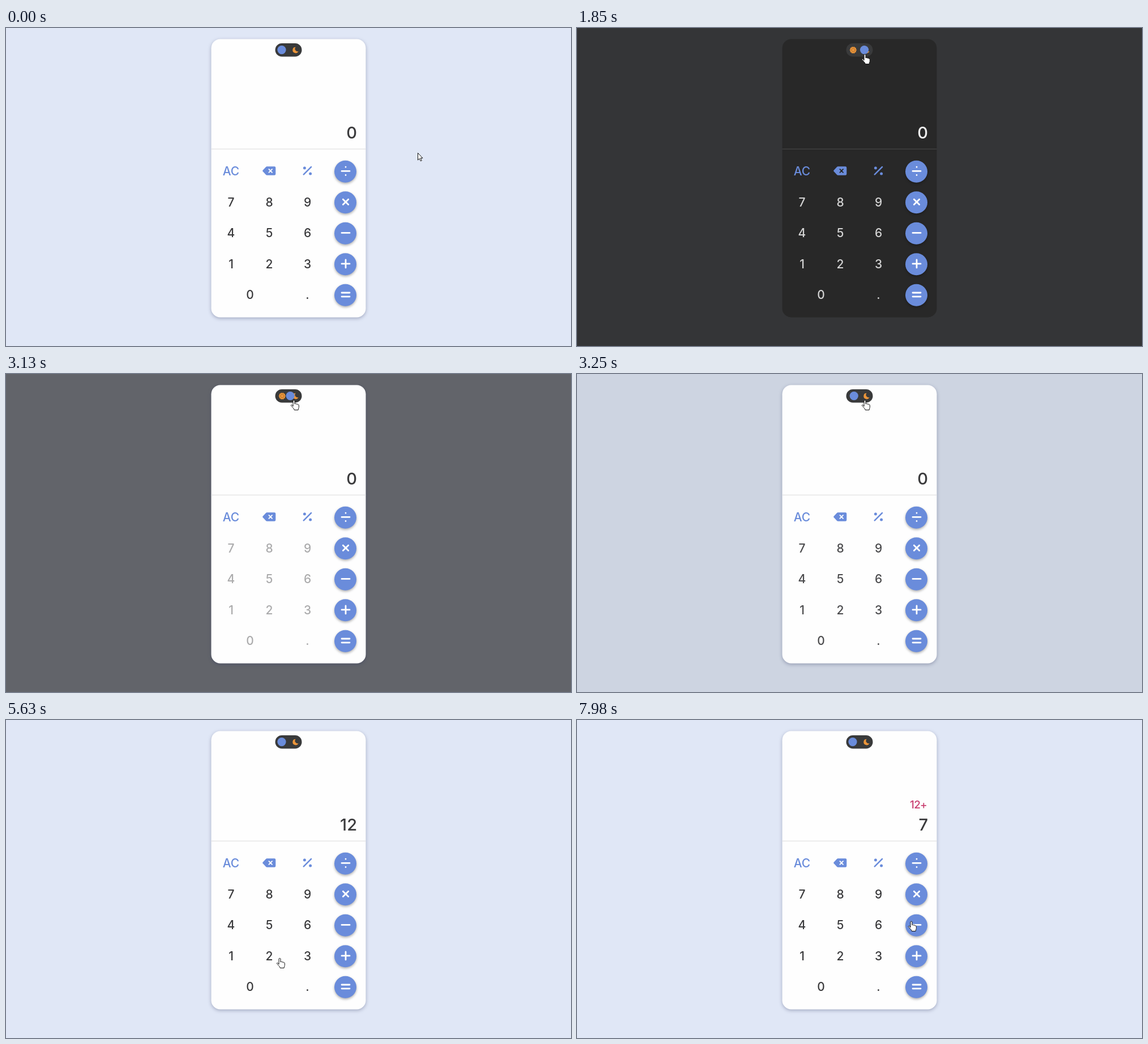
These frames come from a looping animation (998x561 px, 8 s). An HTML page:

```html
<!DOCTYPE html>
<html lang="en">
<head>
<meta charset="utf-8">
<title>Calculator</title>
<style>
  html, body { margin: 0; width: 100%; height: 100%; overflow: hidden; }
  svg { display: block; width: 100vw; height: 100vh; }
  text { font-family: Inter, "Open Sans", sans-serif; font-weight: 500; }
  #keys text { font-size: 21px; text-anchor: middle; }
  #value, #sum { text-anchor: end; }
  #value { font-size: 29px; }
  #sum { font-size: 19px; letter-spacing: -.8px; fill: #c93f70; }
  #card { filter: drop-shadow(0 2px 3px rgba(40, 50, 90, .34)); }
  .dark #card { filter: none; }
  .round { fill: #6a8cdb; filter: drop-shadow(0 2px 2px rgba(0, 0, 0, .32)); }
  .sign { stroke: #fff; stroke-width: 2.8; stroke-linecap: round; }
  .blue { fill: #6a8cdb; }
  .cursor { fill: #fff; stroke: #111; stroke-width: 1; stroke-linejoin: round; }
</style>
</head>
<body>
<svg id="stage" viewBox="0 0 998 561">
  <rect id="back" width="998" height="561"/>
  <rect id="card" x="362.5" y="19.5" width="273" height="491" rx="16"/>
  <path id="rule" d="M362.5 213.5H635.5"/>
  <rect x="475.5" y="27" width="47" height="23.5" rx="11.75" fill="#393a3b"/>
  <g id="sun" fill="#ec9539"></g>
  <path fill="#ec9539" d="M511.6 33.7a5.3 5.3 0 1 0 4.9 7.4a4.6 4.6 0 0 1-4.9-7.4z"/>
  <circle id="ball" cy="38.6" r="7.6" class="blue"/>
  <text id="sum" x="618" y="156"></text>
  <text id="value" x="620" y="194.5"></text>
  <g id="keys"></g>
  <g class="blue">
    <path d="M453.6 251.1l5.6-6a2.4 2.4 0 0 1 1.8-.8h13a2.3 2.3 0 0 1 2.3 2.3v10.8a2.3 2.3 0 0 1-2.3 2.3h-13a2.4 2.4 0 0 1-1.8-.8l-5.6-6a1.3 1.3 0 0 1 0-1.8z"/>
    <path id="cross" d="M464.4 249.2l5.6 5.6m0-5.6l-5.6 5.6" stroke-width="1.9" stroke-linecap="round"/>
    <path d="M525.8 258.4L539 245.2" stroke="#6a8cdb" stroke-width="2.5" stroke-linecap="round"/>
    <circle cx="527.4" cy="246.9" r="2.5"/>
    <circle cx="537.6" cy="257" r="2.5"/>
  </g>
  <g id="signs"></g>
  <g id="pointer">
    <path id="arrow" class="cursor" d="M.5 .5V13l2.8-2.7 2 4.4 2-.9-2-4.3H9z"/>
    <path id="hand" class="cursor" d="M-1 11V1.8a1.5 1.5 0 0 1 3 0V7c.6-1.1 2.7-.9 2.9.4 .8-.9 2.5-.5 2.6.8 .7-.6 1.8-.1 1.8 1.2V12.400c0 1.900-1.200 2.700-1.200 5.100H1.200c0-2-2.300-3.600-3.300-5.200L-4.500 10c-.7-1 .8-2.200 1.900-1.200z"/>
  </g>
</svg>
<script>
const LOOP = 8000, FADE = 300, TO_DARK = 1682, TO_LIGHT = 3060;
const COLS = [397.5, 465, 532.5, 600], ROWS = [252.5, 307, 361.5, 416, 470.5];
const PINK = [201, 63, 112], INK = [58, 58, 60], PALE = [238, 238, 238];

// time, x, y of the pointer tip
const PATH = [
  [0, 727, 220], [30, 727, 220], [250, 699, 170], [400, 650, 118], [790, 508, 54],
  [1190, 508, 46], [3690, 508, 46], [4100, 455, 230], [4490, 405, 415], [4740, 405, 415],
  [5290, 470, 420], [5540, 470, 420], [6000, 598, 417], [6190, 598, 417],
  [6620, 412, 311], [6800, 400, 301], [7240, 400, 301], [7980, 590, 355], [8000, 590, 355]
];
// key, press, release
const PRESSES = [["1", 4530, 4690], ["2", 5360, 5500], ["7", 6860, 6985]];
// time, upper line, lower line
const DISPLAY = [[0, "", "0"], [4690, "", "1"], [5500, "", "12"], [6130, "12+", "0"], [6985, "12+", "7"]];

const $ = id => document.getElementById(id);
const clamp = v => Math.max(0, Math.min(1, v));
const mix = (a, b, k) => a.map((v, i) => v + (b[i] - v) * k);
const rgb = c => `rgb(${c.map(Math.round)})`;

function add(parent, tag, attrs, content = "") {
  const el = document.createElementNS("http://www.w3.org/2000/svg", tag);
  for (const name in attrs) el.setAttribute(name, attrs[name]);
  el.textContent = content;
  return parent.appendChild(el);
}

// CSS "ease": cubic-bezier(.25, .1, .25, 1)
function ease(x) {
  x = clamp(x);
  let lo = 0, hi = 1, s = x;
  for (let i = 0; i < 18; i++) {
    s = (lo + hi) / 2;
    if (.75 * s * (1 - s) + s ** 3 < x) lo = s; else hi = s;
  }
  return .3 * s * (1 - s) ** 2 + 3 * s * s * (1 - s) + s ** 3;
}

const numbers = {};
function addNumber(label, x, row) {
  numbers[label] = add($("keys"), "text", { x, y: ROWS[row] + 7.6 }, label);
}
["789", "456", "123"].forEach((line, r) => [...line].forEach((d, c) => addNumber(d, COLS[c], r + 1)));
addNumber("0", 431, 4);
addNumber(".", COLS[2], 4);
add($("keys"), "text", { x: COLS[0], y: 260, class: "blue" }, "AC");

const SIGNS = ["M-7 0H7M0-7.200V-7.100M0 7.200V7.100", "M-4.700-4.700L4.700 4.700M4.700-4.700L-4.700 4.700",
  "M-7 0H7", "M-7 0H7M0-7V7", "M-7-3.400H7M-7 3.400H7"];
SIGNS.forEach((d, r) => {
  add($("signs"), "circle", { cx: 599.5, cy: ROWS[r] + .7, r: 19.5, class: "round" });
  add($("signs"), "path", { d, class: "sign", transform: `translate(600 ${ROWS[r] - .1})` });
});

for (let i = 0; i < 10; i++) {
  const a = i * Math.PI / 5;
  add($("sun"), "circle", { cx: 487.8 + 4.6 * Math.cos(a), cy: 38.8 + 4.6 * Math.sin(a), r: 1.5 });
}
add($("sun"), "circle", { cx: 487.8, cy: 38.8, r: 4.6 });
add($("sun"), "circle", { cx: 487.8, cy: 38.8, r: 3, fill: "none", stroke: "#a36a2f", "stroke-width": .8 });

function slope(i, axis) {
  const a = PATH[i - 1], p = PATH[i], b = PATH[i + 1];
  const same = (u, v) => u[1] === v[1] && u[2] === v[2];
  if (!a || !b || same(a, p) || same(p, b)) return 0;
  return (b[axis] - a[axis]) / (b[0] - a[0]);
}

function pointerAt(t) {
  let i = 0;
  while (i < PATH.length - 2 && t >= PATH[i + 1][0]) i++;
  const a = PATH[i], b = PATH[i + 1], span = b[0] - a[0], s = (t - a[0]) / span;
  return [1, 2].map(axis =>
    a[axis] + (b[axis] - a[axis]) * s * s * (3 - 2 * s) +
    span * s * (1 - s) * (slope(i, axis) * (1 - s) - slope(i + 1, axis) * s));
}

function overButton(x, y) {
  if (y < 213) return x > 475 && x < 523 && y > 27 && y < 52;
  return COLS.some(c => Math.abs(x - c) < 24) && ROWS.some(r => Math.abs(y - r) < 20);
}

function render(t) {
  const dark = t >= TO_DARK && t < TO_LIGHT;
  const night = ease((t - TO_DARK) / FADE) - ease((t - TO_LIGHT) / FADE);
  $("stage").setAttribute("class", dark ? "dark" : "");
  $("back").style.fill = rgb(mix([224, 231, 246], [23, 23, 23], night));
  $("card").style.fill = dark ? "#282828" : "#fefefe";
  $("cross").style.stroke = dark ? "#282828" : "#fefefe";
  $("rule").style.stroke = dark ? "#484848" : "#dcdcde";
  $("ball").setAttribute("cx", 487 + 24 * night);

  const color = mix(INK, PALE, night);
  for (const label in numbers) {
    const press = PRESSES.find(p => p[0] === label);
    const hot = press ? ease((t - press[1]) / 140) - ease((t - press[2]) / 140) : 0;
    numbers[label].style.fill = rgb(mix(color, PINK, clamp(hot)));
  }

  const shown = DISPLAY.filter(d => d[0] <= t).pop();
  $("sum").textContent = shown[1];
  $("value").textContent = shown[2];
  $("value").style.fill = rgb(dark ? PALE : INK);

  const [x, y] = pointerAt(t), hand = overButton(x, y);
  $("pointer").setAttribute("transform", `translate(${Math.round(x)} ${Math.round(y)})`);
  $("hand").style.display = hand ? "" : "none";
  $("arrow").style.display = hand ? "none" : "";
}

let start;
function tick(now) {
  start ??= now;
  render((now - start) % LOOP);
  requestAnimationFrame(tick);
}
render(0);
requestAnimationFrame(tick);
</script>
</body>
</html>
```
